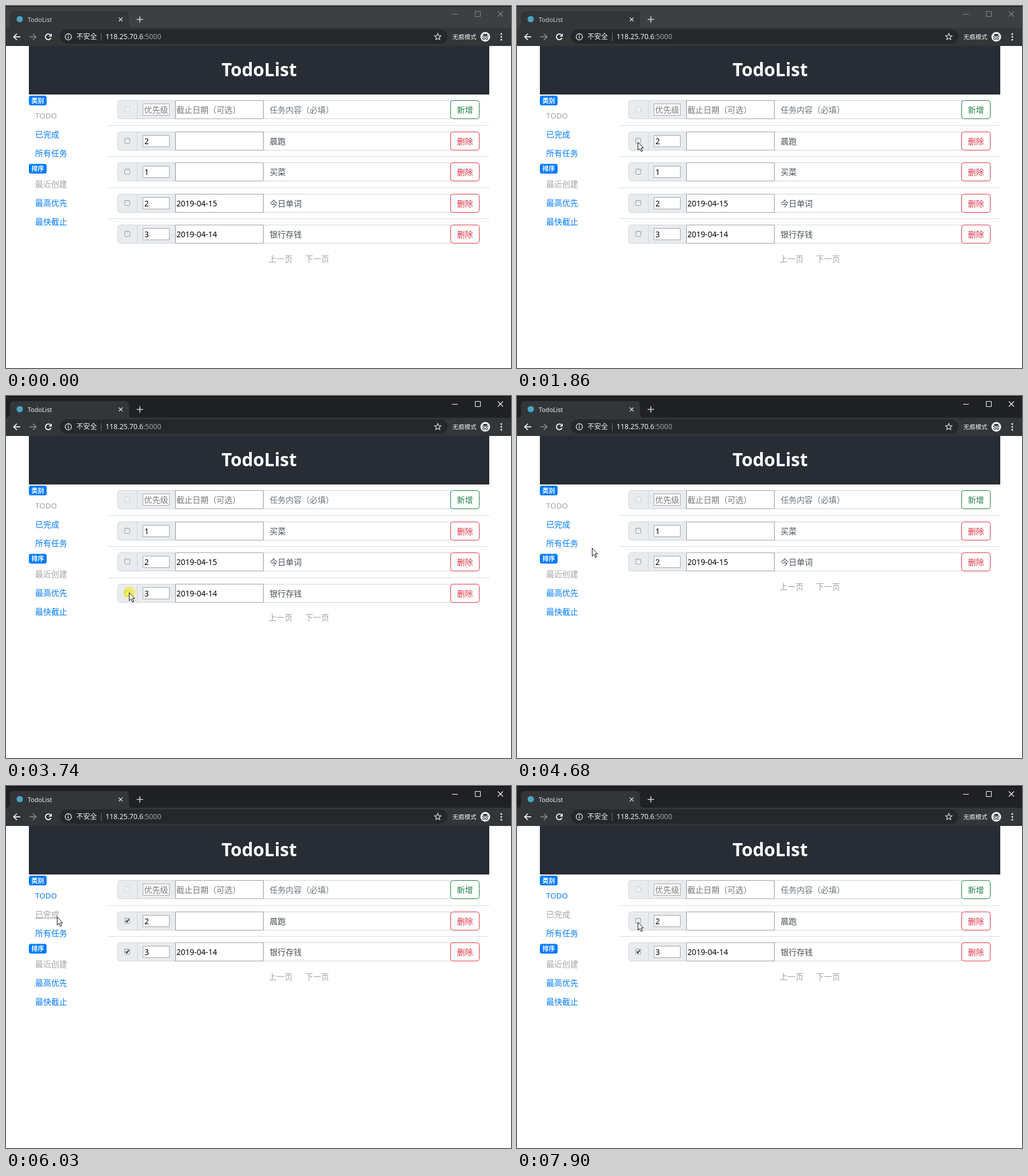
An HTML page with a canvas that plays this animation: 883x634 px, repeating every 7.99 s.

```html
<!DOCTYPE html>
<html lang="zh">
<head>
<meta charset="utf-8">
<title>TodoList</title>
<style>
html, body { margin: 0; width: 100%; height: 100%; overflow: hidden; background: #fff; }
canvas { display: block; }
</style>
</head>
<body>
<canvas id="stage" width="883" height="634"></canvas>
<script>
const ctx = document.getElementById('stage').getContext('2d');
const LOOP = 7990;
const FONT = '"Noto Sans", "Noto Sans CJK SC", "Noto Sans CJK JP", sans-serif';
const BLUE = '#007bff', GRAY = '#a3a3a3', RED = '#dc3545', GREEN = '#1f7f45';

const RUN = { name: '晨跑', level: 2, due: '' };
const SHOP = { name: '买菜', level: 1, due: '' };
const WORDS = { name: '今日单词', level: 2, due: '2019-04-15' };
const BANK = { name: '银行存钱', level: 3, due: '2019-04-14' };

// Lists by start time; ticked holds the row numbers that are checked.
const lists = [
  { at: 0, tasks: [RUN, SHOP, WORDS, BANK], ticked: [] },
  { at: 2170, tasks: [RUN, SHOP, WORDS, BANK], ticked: [0] },
  { at: 2320, tasks: [SHOP, WORDS, BANK], ticked: [] },
  { at: 3890, tasks: [SHOP, WORDS, BANK], ticked: [2] },
  { at: 4050, tasks: [SHOP, WORDS], ticked: [] },
  { at: 5950, tasks: [RUN, BANK], ticked: [0, 1] },
  { at: 7900, tasks: [RUN, BANK], ticked: [1] }
];

const clicks = [[2000, 2170], [3740, 3890], [5620, 5790], [7740, 7900]];

const linear = p => p;
const easeOut = p => 1 - (1 - p) ** 2;
const smooth = p => p * p * (3 - 2 * p);

// Pointer moves: first and last step time, step count, easing, way points.
const moves = [
  [220, 1010, 11, easeOut, [[946, 678], [258, 253]]],
  [1070, 1860, 11, easeOut, [[258, 253], [211, 238]]],
  [2320, 3110, 11, smooth, [[211, 238], [213, 240], [227, 330]]],
  [3190, 3260, 2, linear, [[227, 330], [226, 341]]],
  [3410, 3660, 4, easeOut, [[226, 341], [215, 344]]],
  [3890, 4680, 11, smooth, [[215, 344], [131, 266]]],
  [4760, 5000, 4, easeOut, [[131, 266], [102, 264]]],
  [5390, 5620, 4, easeOut, [[102, 264], [89, 229]]],
  [6330, 6640, 5, smooth, [[89, 229], [78, 197]]],
  [6790, 7190, 6, linear, [[78, 197], [270, 244], [80, 232]]],
  [7340, 7740, 6, easeOut, [[80, 232], [228, 240], [211, 238]]]
];

const links = [
  ['TODO', 192, 38], ['已完成', 225, 42], ['所有任务', 258, 56],
  ['最近创建', 312, 56], ['最高优先', 345, 56], ['最快截止', 378, 56]
];

function along(points, p) {
  const n = points.length - 1;
  const i = Math.min(n - 1, Math.floor(p * n));
  const k = p * n - i, a = points[i], b = points[i + 1];
  return [0, 1].map(j => Math.round(a[j] + (b[j] - a[j]) * k));
}

function pointerAt(t) {
  const move = moves.filter(m => t >= m[0]).pop();
  if (!move) return null;
  const [from, to, n, ease, points] = move;
  const step = Math.min(n - 1, Math.floor((t - from) / (to - from) * (n - 1) + 1e-6));
  return along(points, ease((step + 1) / n));
}

function text(s, x, y, size, color, weight = 400, align = 'left') {
  ctx.font = `${weight} ${size}px ${FONT}`;
  ctx.textAlign = align;
  ctx.fillStyle = color;
  ctx.fillText(s, x, y);
}

function rect(x, y, w, h, color) {
  ctx.fillStyle = color;
  ctx.fillRect(x, y, w, h);
}

function box(x, y, w, h, r, fill, edge) {
  ctx.beginPath();
  ctx.roundRect(x, y, w, h, r);
  if (fill) { ctx.fillStyle = fill; ctx.fill(); }
  if (edge) { ctx.strokeStyle = edge; ctx.lineWidth = 1; ctx.stroke(); }
}

function line(points, color, width = 1) {
  ctx.beginPath();
  points.forEach(([x, y]) => ctx.lineTo(x, y));
  ctx.strokeStyle = color;
  ctx.lineWidth = width;
  ctx.stroke();
}

function disc(x, y, r, color) {
  ctx.beginPath();
  ctx.arc(x, y, r, 0, Math.PI * 2);
  ctx.fillStyle = color;
  ctx.fill();
}

function ring(x, y, r, color, width, from = 0, to = Math.PI * 2) {
  ctx.beginPath();
  ctx.arc(x, y, r, from, to);
  ctx.strokeStyle = color;
  ctx.lineWidth = width;
  ctx.stroke();
}

function cross(x, y, r, color, width) {
  line([[x - r, y - r], [x + r, y + r]], color, width);
  line([[x + r, y - r], [x - r, y + r]], color, width);
}

function arrow(x, y, dir, color) {
  line([[x - 6 * dir, y], [x + 5 * dir, y]], color, 1.7);
  line([[x, y - 5.5], [x + 5.5 * dir, y], [x, y + 5.5]], color, 1.7);
}

function star(x, y, r) {
  const points = [];
  for (let i = 0; i < 12; i++) {
    const a = -Math.PI / 2 + i * Math.PI / 5, d = i % 2 ? r * 0.45 : r;
    points.push([x + d * Math.cos(a), y + d * Math.sin(a)]);
  }
  line(points, '#d5d7da', 1.2);
}

function drawTab() {
  ctx.beginPath();
  ctx.moveTo(0, 38);
  ctx.quadraticCurveTo(7, 38, 7, 31);
  ctx.lineTo(7, 16);
  ctx.quadraticCurveTo(7, 9, 14, 9);
  ctx.lineTo(208, 9);
  ctx.quadraticCurveTo(215, 9, 215, 16);
  ctx.lineTo(215, 31);
  ctx.quadraticCurveTo(215, 38, 222, 38);
  ctx.fillStyle = '#323639';
  ctx.fill();
}

function drawBrowser(active) {
  const winColor = active ? '#fff' : '#85888b';
  const soft = active ? '#f1f3f4' : '#d0d2d4';
  rect(0, 0, 883, 38, active ? '#202124' : '#3c4043');
  rect(0, 0, 883, 1, '#0b0b0c');
  rect(0, 38, 883, 32, '#323639');
  drawTab();
  disc(24, 23, 5.5, '#4aa5c2');
  text('TodoList', 38, 27.5, 10.8, soft);
  cross(200.5, 23.5, 3.3, '#d5d7da', 1.3);
  line([[228.5, 23.5], [239.5, 23.5]], '#d5d7da', 1.5);
  line([[234, 18], [234, 29]], '#d5d7da', 1.5);

  line([[780, 14.5], [790, 14.5]], winColor);
  box(820.5, 9.5, 9, 9, 0, null, winColor);
  cross(864.5, 14, 4.5, winColor, 1.1);

  arrow(19, 54, -1, '#fff');
  arrow(47, 54, 1, '#85888b');
  ring(74, 54, 5, '#fff', 1.7, 0.4, 5.4);
  ctx.beginPath();
  ctx.moveTo(80, 48);
  ctx.lineTo(80, 53.5);
  ctx.lineTo(74.5, 53.5);
  ctx.fillStyle = '#fff';
  ctx.fill();

  box(94, 41, 678, 25, 12.5, '#25282b');
  ring(109, 54, 5.5, '#e8eaed', 1.3);
  rect(108.3, 53, 1.4, 4, '#e8eaed');
  rect(108.3, 50.5, 1.4, 1.5, '#e8eaed');
  text('不安全', 123, 58, 12, '#f1f3f4');
  rect(166, 47, 1, 14, '#6b6f73');
  text('118.25.70.6', 174, 58, 12.3, '#f5f6f7');
  text(':5000', 240, 58, 12.3, '#a0a4a8');
  star(755, 54, 6);
  text('无痕模式', 780.5, 58, 10.5, '#f1f3f4');

  disc(838, 54, 8.5, '#f1f3f4');
  rect(834.5, 49, 7, 3, '#323639');
  rect(832, 52.5, 12, 1.2, '#323639');
  ring(835.4, 57, 1.8, '#323639', 1.1);
  ring(840.6, 57, 1.8, '#323639', 1.1);
  for (const y of [49, 54, 59]) disc(866, y, 1.5, '#f1f3f4');
}

function badge(s, y) {
  box(40, y, 31, 17, 3.5, BLUE);
  text(s, 55.5, y + 12.5, 11, '#fff', 700, 'center');
}

function drawSidebar(current, pointer) {
  badge('类别', 157);
  badge('排序', 276.5);
  links.forEach(([label, y, width], i) => {
    const color = i === current || i === 3 ? GRAY : BLUE;
    text(label, 51, y + 5, i ? 14 : 13.4, color);
    const over = pointer && pointer[0] >= 40 && pointer[0] < 62 + width &&
      Math.abs(pointer[1] - y) < 16.5;
    if (over) rect(51, y + 6, width, 1, color);
  });
}

function checkbox(y, ticked, off) {
  const fill = ctx.createLinearGradient(0, y, 0, y + 9);
  fill.addColorStop(0, off ? '#eceef0' : '#dcdcdc');
  fill.addColorStop(1, off ? '#f1f2f4' : '#f6f6f6');
  box(207.5, y + 0.5, 9, 9, 1.5, fill, off ? '#cfd1d4' : '#9c9c9c');
  if (ticked) line([[209.3, y + 5], [211.2, y + 7.2], [214.8, y + 2.4]], '#333', 1.8);
}

function rowFrame(mid, ticked, isForm) {
  const top = Math.floor(mid - 16.5) + 0.5;
  box(195.5, top, 100.5, 32, [4, 0, 0, 4], '#e9ecef', '#ced4da');
  rect(229, top, 1, 32, '#ced4da');
  checkbox(top + 10.5, ticked, isForm);
  box(239.5, top + 6, 46, 20, 0, '#fff', '#a6a6a6');
  box(450.5, top, 327, 32, 0, '#fff', '#ced4da');
  box(296.5, top, 153.5, 32, 0, '#fff', '#a0a0a0');
  const color = isForm ? GREEN : RED;
  box(777.5, top, 50, 32, 4, '#fff', color);
  text(isForm ? '新增' : '删除', 802.5, top + 21.5, 14, color, 400, 'center');
  return top + 21.5;
}

function drawForm() {
  const base = rowFrame(182, false, true);
  text('优先级', 241.5, base, 14, '#777');
  text('截止日期（可选）', 298, base, 14, '#777');
  text('任务内容（必填）', 461, base, 14, '#6c757d');
}

function drawTasks({ tasks, ticked }) {
  tasks.forEach((task, i) => {
    const mid = 236.5 + i * 54.5;
    rect(178, Math.floor(mid - 27.5), 667, 1, '#dcdcdc');
    const base = rowFrame(mid, ticked.includes(i), false);
    text(task.level, 242, base, 13.6, '#000');
    text(task.due, 298, base, 13.6, '#000');
    text(task.name, 461, base, 14, '#495057');
  });
  const y = Math.floor(182 + tasks.length * 54.5 + 48);
  text('上一页', 459, y, 14, GRAY);
  text('下一页', 523, y, 14, GRAY);
}

function drawPointer([x, y], pressed) {
  if (pressed) {
    ctx.globalAlpha = 0.65;
    disc(x + 0.5, y, 10.5, '#f0ec2a');
    ctx.globalAlpha = 1;
  }
  const shape = [[0, 0], [0, 14], [3.2, 11], [5.6, 16.3], [7.8, 15.4], [5.5, 10.2], [9.6, 10.2]];
  ctx.beginPath();
  shape.forEach(([dx, dy]) => ctx.lineTo(x + 0.5 + dx, y + 0.5 + dy));
  ctx.closePath();
  ctx.fillStyle = '#fff';
  ctx.fill();
  ctx.strokeStyle = '#111';
  ctx.lineWidth = 1;
  ctx.stroke();
}

function draw(t) {
  const pointer = pointerAt(t);
  rect(0, 0, 883, 634, '#fff');
  drawBrowser(t >= 2000);
  rect(40, 70, 805, 85, '#282c34');
  text('TodoList', 442.5, 123, 31.5, '#fff', 600, 'center');
  drawSidebar(t < 5790 ? 0 : 1, pointer);
  drawForm();
  drawTasks(lists.filter(s => t >= s.at).pop());
  if (pointer) drawPointer(pointer, clicks.some(([a, b]) => t >= a && t < b));
}

const start = performance.now();
function tick() {
  draw((performance.now() - start) % LOOP);
  requestAnimationFrame(tick);
}
tick();
</script>
</body>
</html>
```
